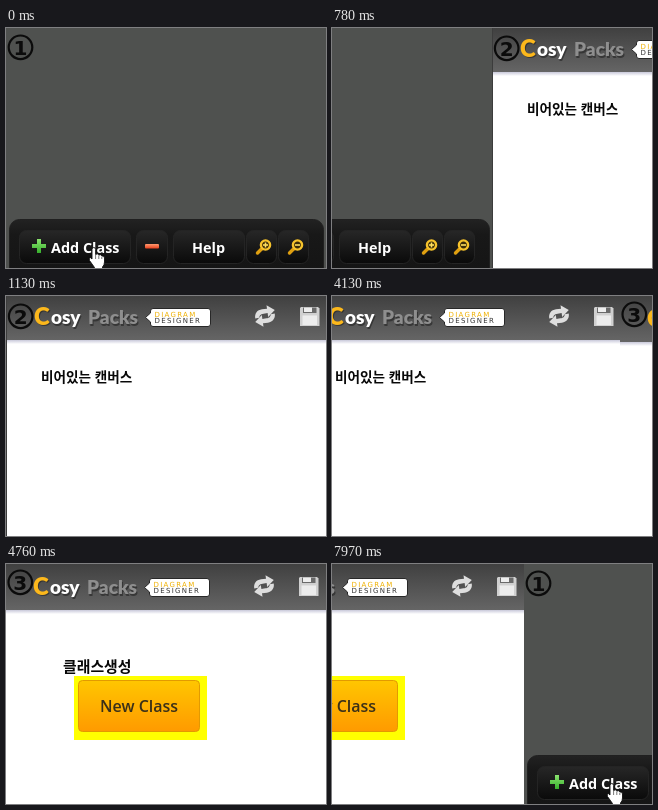
Animation, 320 px wide and 240 px high, one loop 8 s. Source, as an HTML page:

```html
<!DOCTYPE html>
<html lang="ko">
<head>
<meta charset="utf-8">
<title>Class diagram steps</title>
<style>
  html, body { margin: 0; width: 100%; height: 100%; overflow: hidden; background: #fff; }
  svg { display: block; }
  .strip { animation: slide 8s infinite; }
  /* ten 32px jumps per slide, one every 70ms */
  @keyframes slide {
    0%       { transform: translateX(0); animation-timing-function: step-end; }
    6.245%   { transform: translateX(0); animation-timing-function: steps(10, start); }
    14.995%  { transform: translateX(-320px); animation-timing-function: step-end; }
    51.62%   { transform: translateX(-320px); animation-timing-function: steps(10, start); }
    60.37%   { transform: translateX(-640px); animation-timing-function: step-end; }
    96.995%  { transform: translateX(-672px); animation-timing-function: step-end; }
    97.87%   { transform: translateX(-704px); animation-timing-function: step-end; }
    98.745%  { transform: translateX(-736px); animation-timing-function: step-end; }
    99.62%, 100% { transform: translateX(-768px); }
  }
  .label { font: 700 14.4px "Open Sans", "Noto Sans", sans-serif; fill: #fff; }
  .hangul { font-family: "Noto Sans CJK KR", "Noto Sans CJK", sans-serif; font-weight: 700; fill: #080808; }
  .num circle { fill: none; stroke: #0b0b0b; stroke-width: 2.2; }
  .num text { font: 700 20px "DejaVu Sans", sans-serif; text-anchor: middle; fill: #0b0b0b; }
  .brand { font: 900 19px Lato, sans-serif; }
  .brand .cap { font-size: 24px; }
  .tag { font: 7px "DejaVu Sans", sans-serif; letter-spacing: 1.3px; }
  .key { fill: url(#key); stroke: #242424; }
</style>
</head>
<body>
<svg width="320" height="240" viewBox="0 0 320 240">
  <defs>
    <linearGradient id="bar" x2="0" y2="1">
      <stop stop-color="#404040"/><stop offset="1" stop-color="#656565"/>
    </linearGradient>
    <linearGradient id="shade" x2="0" y2="1">
      <stop stop-color="#c9c9da"/><stop offset="1" stop-color="#fff"/>
    </linearGradient>
    <linearGradient id="dock" x2="0" y2="1">
      <stop stop-color="#222"/><stop offset=".25" stop-color="#181818"/><stop offset="1" stop-color="#141414"/>
    </linearGradient>
    <linearGradient id="key" x2="0" y2="1">
      <stop stop-color="#272727"/><stop offset="1" stop-color="#0a0a0a"/>
    </linearGradient>
    <linearGradient id="gold" x2="0" y2="1">
      <stop stop-color="#ffc600"/><stop offset="1" stop-color="#ff9a00"/>
    </linearGradient>
    <linearGradient id="leaf" x2="0" y2="1">
      <stop stop-color="#8be36f"/><stop offset="1" stop-color="#36b02c"/>
    </linearGradient>
    <linearGradient id="ember" x2="0" y2="1">
      <stop stop-color="#ff9a70"/><stop offset="1" stop-color="#e8401c"/>
    </linearGradient>

    <g id="lens">
      <path d="M-4 4L-8 8" stroke="#e0a010" stroke-width="3.400" stroke-linecap="round"/>
      <circle r="4.600" fill="#3a2c08" stroke="#f6c32c" stroke-width="2.400"/>
      <path d="M-2.500 0H2.500" stroke="#ffe060" stroke-width="1.600"/>
    </g>

    <path id="arrow" d="M-10 1C-10-4-7-7-2-7H3V-10.500L10.500-4.500L3 1.500V-2.500H-1C-4.500-2.500-5.500-1-6 1Z" fill="#dedede"/>

    <g id="tools">
      <g class="brand">
        <g fill="#222" opacity=".6" transform="translate(1 1.500)">
          <text class="cap" x="28" y="28.500">C</text>
          <text x="45" y="28">osy</text>
          <text x="82" y="28">Packs</text>
        </g>
        <text class="cap" x="28" y="28.500" fill="#fcb81c">C</text>
        <text x="45" y="28" fill="#fff">osy</text>
        <text x="82" y="28" fill="#8e8e8e">Packs</text>
      </g>
      <path d="M139.500 21.500L144.500 17V15Q144.500 12.500 147 12.500H202Q204.500 12.500 204.500 15V28Q204.500 30.500 202 30.500H147Q144.500 30.500 144.500 28V26Z" fill="#fff" stroke="#282828"/>
      <g class="tag">
        <text x="148.500" y="20.800" fill="#efb000">DIAGRAM</text>
        <text x="148.500" y="27.200" fill="#333">DESIGNER</text>
      </g>
      <g transform="translate(259 20) rotate(-8)">
        <use href="#arrow"/>
        <use href="#arrow" transform="rotate(180)"/>
      </g>
      <path d="M295 11H312L313.500 12.500V30H294V12Z" fill="#d0d0d0"/>
      <path d="M297 11.500H310.500V17H297Z" fill="#6a6a6a"/>
      <path d="M298 11.500H306V16H298Z" fill="#eee"/>
      <path d="M296.500 19.500H311V29H296.500Z" fill="#ececec"/>
    </g>

    <g id="dockPage">
      <rect width="320" height="240" fill="#4f514f"/>
      <g class="num"><circle cx="14.500" cy="19.300" r="11.800"/><text x="14.500" y="26.500">1</text></g>
      <rect x="3.500" y="191.500" width="314" height="60" rx="10" fill="url(#dock)" stroke="#202020"/>
      <rect class="key" x="13.500" y="202.500" width="111" height="33" rx="7"/>
      <rect class="key" x="130.500" y="202.500" width="31" height="33" rx="7"/>
      <rect class="key" x="167.500" y="202.500" width="71" height="33" rx="7"/>
      <rect class="key" x="240.500" y="202.500" width="30" height="33" rx="7"/>
      <rect class="key" x="272.500" y="202.500" width="30" height="33" rx="7"/>
      <path d="M31 211H35V216H40V220H35V225H31V220H26V216H31Z" fill="url(#leaf)"/>
      <rect x="139" y="216" width="14" height="4.500" rx="1" fill="url(#ember)"/>
      <text class="label" x="45" y="225">Add Class</text>
      <text class="label" x="186" y="225">Help</text>
      <use href="#lens" x="259.500" y="217"/>
      <path d="M259.500 214.500V219.500" stroke="#ffe060" stroke-width="1.600"/>
      <use href="#lens" x="291.500" y="217"/>
      <path d="M86 231V221.500Q86 219.500 87.800 219.500T89.600 221.500V226.500Q91.500 225 93 227Q95 226 96 228Q98.500 227.500 98.500 230V234Q98.500 237 96.500 239V242H88.500V239.500L83.500 232.500Q82.500 230 84.500 229.700Z" fill="#fff" stroke="#111" stroke-width=".9"/>
      <path d="M89.600 227V231M92.800 227.500V231M95.800 228.500V231" stroke="#555" stroke-width=".8"/>
    </g>
  </defs>

  <g class="strip">
    <use href="#dockPage"/>

    <g transform="translate(320)">
      <rect width="320" height="240" fill="#fff"/>
      <rect width="320" height="44" fill="url(#bar)"/>
      <rect y="44" width="320" height="4" fill="url(#shade)"/>
      <rect width="1" height="240" fill="#3c3c3c"/>
      <g class="num"><circle cx="14.700" cy="20.300" r="11.800"/><text x="14.700" y="27.500">2</text></g>
      <use href="#tools"/>
      <text class="hangul" x="35" y="86" font-size="13.600">비어있는 캔버스</text>
    </g>

    <g transform="translate(640)">
      <rect width="320" height="240" fill="#fff"/>
      <rect width="320" height="46" fill="url(#bar)"/>
      <rect y="46" width="320" height="4" fill="url(#shade)"/>
      <g class="num"><circle cx="14.300" cy="18.300" r="11.800"/><text x="14.300" y="25.500">3</text></g>
      <use href="#tools" x="-1" y="2"/>
      <text class="hangul" x="57" y="108" font-size="14.900">클래스생성</text>
      <rect x="68" y="112" width="133" height="64" fill="#ff0"/>
      <rect x="72.500" y="116.500" width="121" height="51" rx="4" fill="url(#gold)" stroke="#e29a00"/>
      <text x="94" y="148" font-family="'Open Sans', 'Noto Sans', sans-serif" font-size="16" font-weight="600" fill="#3b3018">New Class</text>
    </g>

    <use href="#dockPage" x="960"/>
  </g>
</svg>
</body>
</html>
```
